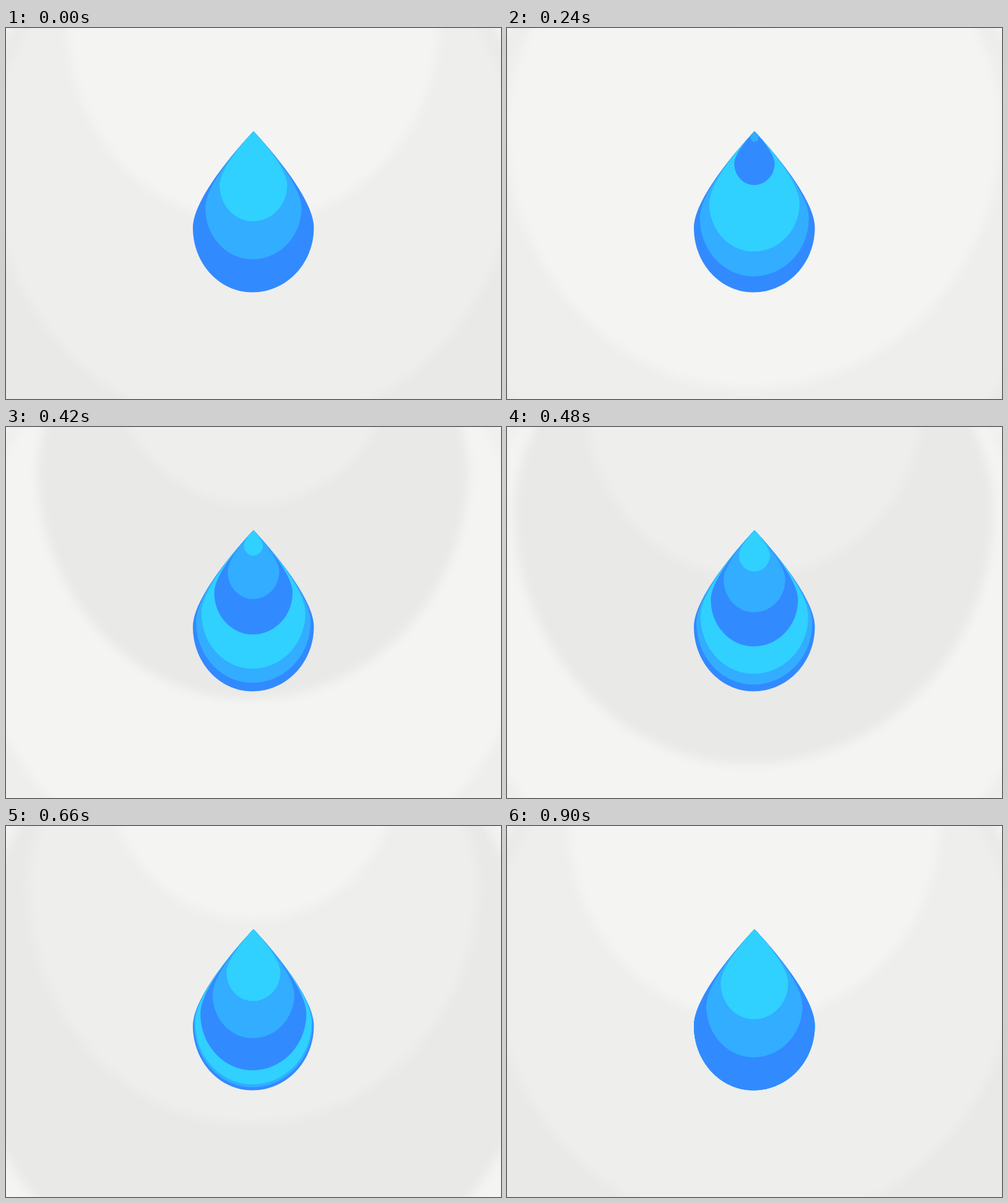
An HTML page that plays this animation: 800x600 px, repeating every 930 ms.

```html
<!DOCTYPE html>
<html lang="en">
<head>
<meta charset="utf-8">
<title>Drop</title>
<style>
  html, body { margin: 0; width: 100%; height: 100%; overflow: hidden; background: #f4f4f2; }
  svg { display: block; width: 800px; height: 600px; }
</style>
</head>
<body>
<svg viewBox="0 0 800 600">
  <defs>
    <filter id="soft" filterUnits="userSpaceOnUse" x="-60" y="-60" width="920" height="720" color-interpolation-filters="sRGB">
      <feGaussianBlur stdDeviation="8"/>
    </filter>
  </defs>
  <rect width="800" height="600" fill="#f4f4f2"/>
  <g id="back" filter="url(#soft)"></g>
  <g id="front"></g>
</svg>
<script>
const LOOP = 930, CYCLE = 900, STEP = 30;

// Drop outline with its tip at the origin
const DROP = 'M0 0C0 0-98 101-98 156C-98 214-55 260.5-2 260.5C53 260.5 97.5 214 97.5 156C97.5 101 0 0 0 0Z';

// A drop grows from start to mid in its first cycle, then settles to full size
const layers = [
  { fill: '#328aff', shade: '#e9e9e8', start: 110, mid: 1, settle: [0, 0] },
  { fill: '#32adff', shade: '#eeeeed', start: 215, mid: .795, settle: [2.5, .35] },
  { fill: '#30d0ff', shade: '#f4f4f2', start: 345, mid: .5585, settle: [1.75, 0] }
];

// Cubic ease from 0 to 1 with the given speeds at both ends
const ease = (u, from, to) =>
  u * u * (3 - 2 * u) + from * u * (1 - u) ** 2 - to * u * u * (1 - u);

function size({ start, mid, settle }, age) {
  if (age <= start) return 0;
  if (age < CYCLE) return mid * ease((age - start) / (CYCLE - start), 2.35, .37);
  return mid + (1 - mid) * ease((age - CYCLE) / CYCLE, ...settle);
}

function addDrop(parent, fill) {
  const path = document.createElementNS('http://www.w3.org/2000/svg', 'path');
  path.setAttribute('d', DROP);
  path.setAttribute('fill', fill);
  document.getElementById(parent).append(path);
  return path;
}

const place = (path, y, s) => path.setAttribute('transform', `translate(400 ${y}) scale(${s})`);

const drops = [CYCLE, 0].flatMap(age => layers.map(layer => ({
  age, layer, front: addDrop('front', layer.fill), back: addDrop('back', layer.shade)
})));

function draw(ms) {
  const t = Math.min(CYCLE, Math.floor(ms % LOOP / STEP) * STEP);
  for (const { age, layer, front, back } of drops) {
    const s = size(layer, t + age);
    place(front, 167, s);
    place(back, -487, s * 5.5);
  }
}

const begin = performance.now();
function tick() {
  draw(performance.now() - begin);
  requestAnimationFrame(tick);
}
tick();
</script>
</body>
</html>
```
